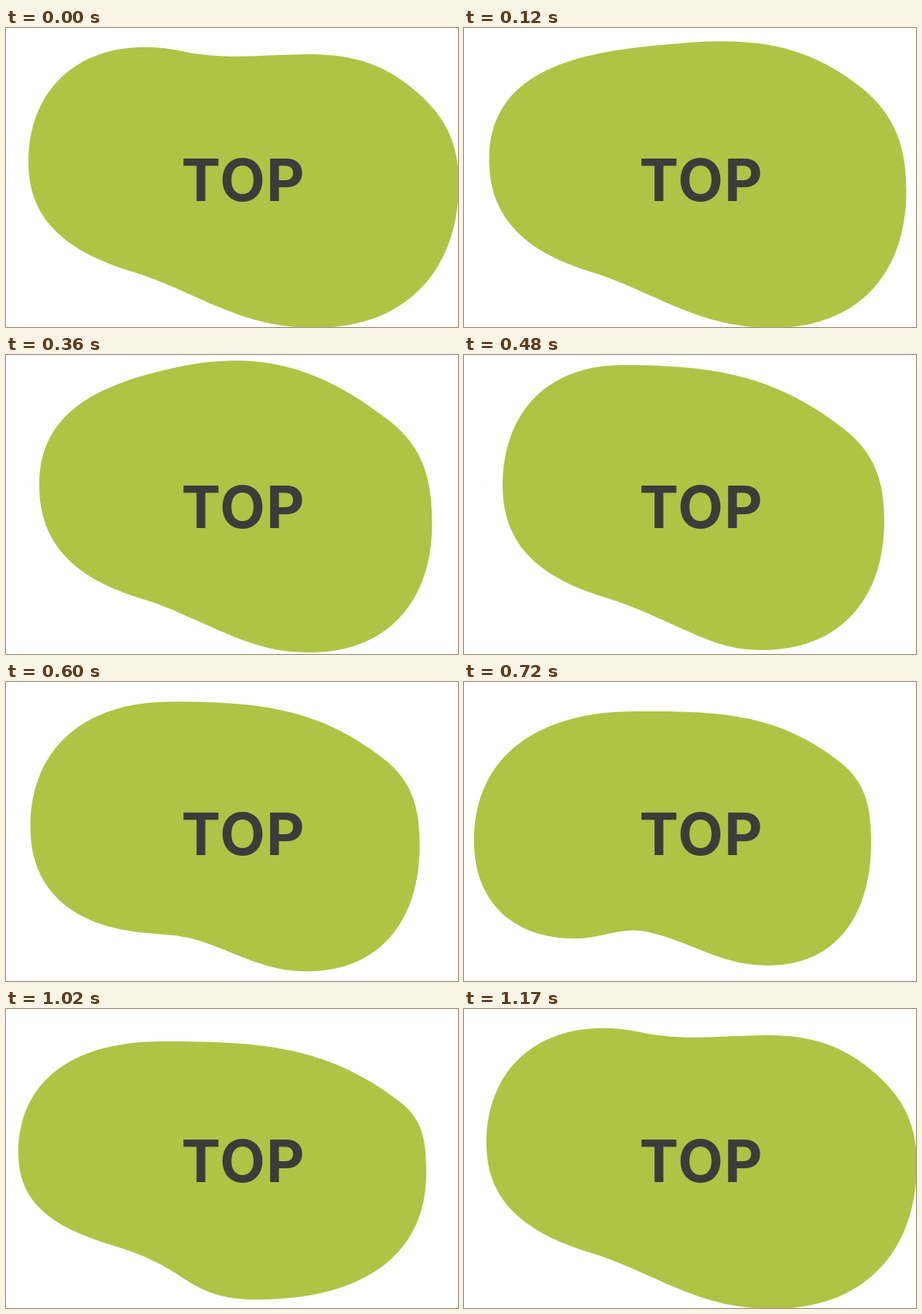
Write an HTML page that moves like this. It is 584 by 387 pixels and loops after 1.2 s.

```html
<!DOCTYPE html>
<html lang="en">
<head>
<meta charset="utf-8">
<title>Top</title>
<style>
  html, body { margin: 0; height: 100%; overflow: hidden; background: #fff; }
  svg { display: block; width: 100vw; height: 100vh; }
  path { fill: #afc445; }
  text { font: 700 76px Inter, sans-serif; letter-spacing: 1.5px; fill: #3c3c3b; text-anchor: middle; }
</style>
</head>
<body>
<svg viewBox="0 0 584 387">
  <path id="blob"/>
  <text x="306.7" y="223.5">TOP</text>
</svg>
<script>
const LOOP = 1200, STEP = 30, FULLNESS = 1.12;

// Clockwise: left, top, shoulder, right, bottom, notch, lower left.
// An anchor is x, y and, where it differs from the usual one, its heading in degrees.
const HEADINGS = [-90, 0, 38, 90, 180, 204, 197];
const base = [[400, 388], [240, 346], [165, 316]];
const start = [[29, 174], [228, 30, 12], [520, 74], [585, 200], ...base];
const poses = [
  { at: 0, anchors: start },
  { at: 240, anchors: [[36, 167], [240, 18, -24], [500, 75], [558, 222], ...base] },
  { at: 480, anchors: [[50, 170], [205, 13], [490, 95], [543, 215], [385, 382], [270, 349], [180, 313]] },
  { at: 720, anchors: [[13, 206], [220, 38], [485, 103], [526, 208], [393, 367], [240, 324, 194], [143, 332, 180]] },
  { at: 900, anchors: [[0, 212], [190, 36], [468, 111], [520, 208], [428, 342], [304, 326, 143], [205, 370, 180]] },
  { at: 1020, anchors: [[16, 187], [200, 42], [510, 121], [543, 212], [325, 376], [230, 349, 214], [135, 305]] },
  { at: 1170, anchors: start },
];

const { sin, cos, atan2, hypot, sqrt, PI } = Math;
const lerp = (a, b, k) => a + (b - a) * k;

// Hobby's handle length relative to the chord, slightly fuller.
const reach = (a, b) => FULLNESS *
  (2 + sqrt(2) * (sin(a) - sin(b) / 16) * (sin(b) - sin(a) / 16) * (cos(a) - cos(b))) /
  (3 * (1 + (sqrt(5) - 1) / 2 * cos(a) + (3 - sqrt(5)) / 2 * cos(b)));

function anchorsAt(time) {
  const next = Math.max(1, poses.findIndex(pose => pose.at >= time));
  const from = poses[next - 1], to = poses[next];
  const k = (time - from.at) / (to.at - from.at);
  return HEADINGS.map((usual, i) => {
    const [x1, y1, h1 = usual] = from.anchors[i];
    const [x2, y2, h2 = usual] = to.anchors[i];
    return { x: lerp(x1, x2, k), y: lerp(y1, y2, k), heading: lerp(h1, h2, k) * PI / 180 };
  });
}

function outline(anchors) {
  const curves = anchors.map((p, i) => {
    const q = anchors[(i + 1) % anchors.length];
    const chord = atan2(q.y - p.y, q.x - p.x), length = hypot(q.x - p.x, q.y - p.y);
    const out = p.heading - chord, into = chord - q.heading;
    const h1 = length * reach(out, into), h2 = length * reach(into, out);
    return `C${[
      p.x + h1 * cos(p.heading), p.y + h1 * sin(p.heading),
      q.x - h2 * cos(q.heading), q.y - h2 * sin(q.heading), q.x, q.y,
    ].map(v => v.toFixed(2))}`;
  });
  return `M${anchors[0].x},${anchors[0].y}${curves.join("")}Z`;
}

const blob = document.getElementById("blob");
const begin = performance.now();

function draw() {
  const elapsed = (performance.now() - begin) % LOOP;
  const time = Math.floor(elapsed / STEP) * STEP;
  blob.setAttribute("d", outline(anchorsAt(time)));
  requestAnimationFrame(draw);
}
draw();
</script>
</body>
</html>
```
